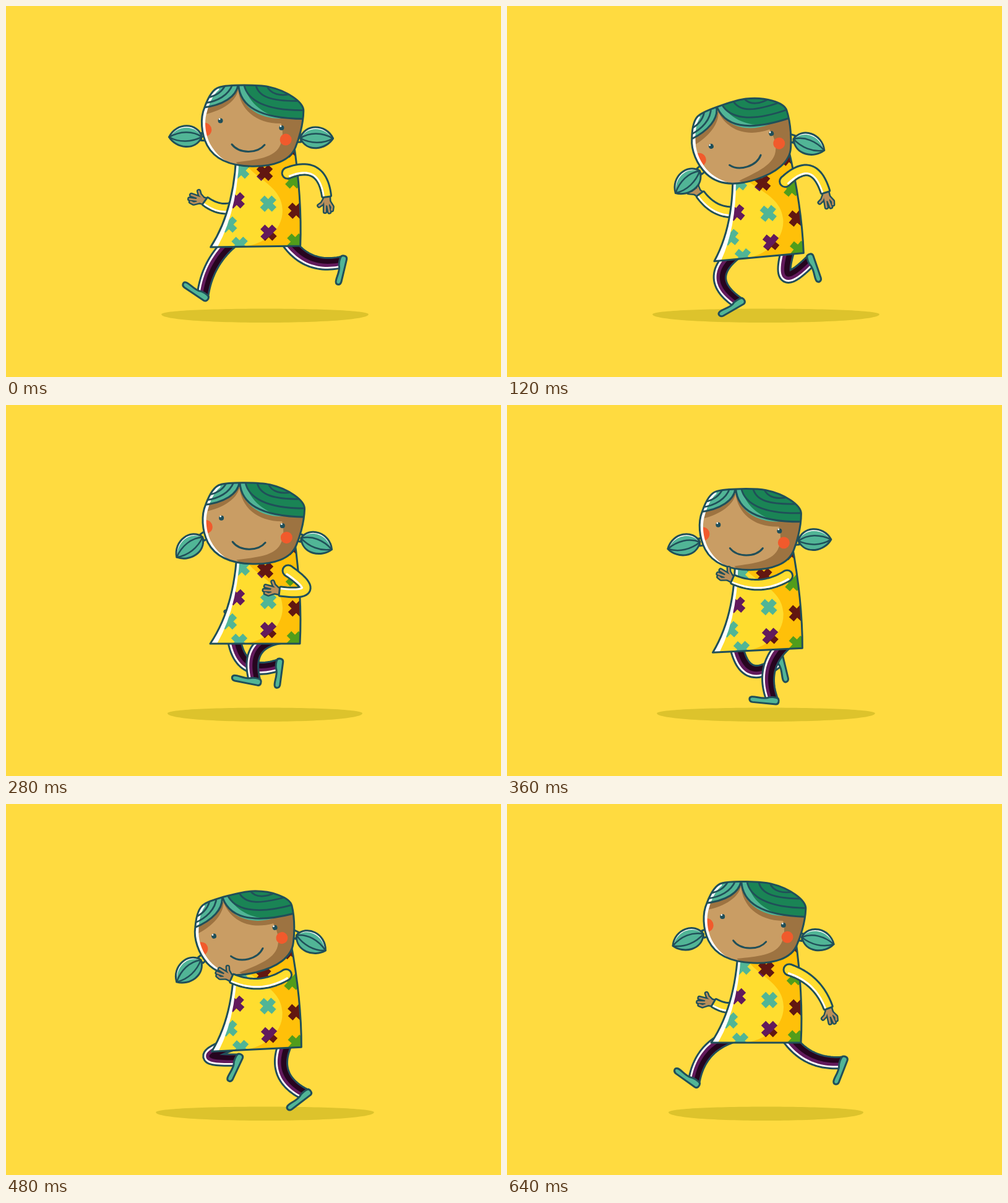
An HTML page with a canvas that plays this animation: 800x600 px, repeating every 680 ms.

```html
<!DOCTYPE html>
<html>
<head>
<meta charset="utf-8">
<style>
  html, body { margin: 0; width: 100%; height: 100%; overflow: hidden; background: #ffdb40; }
  canvas { display: block; }
</style>
</head>
<body>
<canvas id="stage" width="800" height="600"></canvas>
<script>
const ctx = document.getElementById('stage').getContext('2d');
const LOOP = 680, STEP = LOOP / 2, TICK = 40, FOOTFALL = 80;
const LEG_LENGTH = 107, ARM_LENGTH = 91;
const INK = '#204f59', TEAL = '#51b596', GREEN = '#1a8455', YELLOW = '#ffdd2f';
const PURPLE = '#621a5c', SKIN = '#c99d64', SKIN_SHADE = '#9d7341', BLUSH = '#f15a2c', HAND_SKIN = '#b98e5b';

// Key points of each limb's closed path: time, x, y. Wrists are relative to the shoulder.
const ANKLE = [
  [20, 329, 478], [80, 358, 494], [140, 384, 470], [210, 434, 432], [340, 444, 414],
  [420, 418, 408], [480, 375, 414], [550, 303, 439], [640, 302, 450]
];
const NEAR_WRIST = [[0, 63, 37], [80, 65, 1], [200, 63, 61], [360, -87, 6], [480, -87, 6], [560, -1, 81], [640, 63, 61]];
const FAR_WRIST = [[0, -67, 5], [80, -82, -41], [200, -43, 22], [360, 10, 22], [560, -11, 29], [640, -55, 14]];

// Position on a closed path, by monotone cubic interpolation.
function along(keys, time) {
  const n = keys.length, t = (time + LOOP) % LOOP;
  let i = n - 1;
  while (i >= 0 && keys[i][0] > t) i--;
  const row = j => keys[(j + n) % n];
  const at = j => row(j)[0] + Math.floor(j / n) * LOOP;
  const span = at(i + 1) - at(i), u = (t - at(i)) / span, v = 1 - u;
  return [1, 2].map(k => {
    const val = j => row(j)[k];
    const slope = j => (val(j + 1) - val(j)) / (at(j + 1) - at(j));
    const tangent = j => {
      const a = slope(j - 1), b = slope(j);
      return a * b > 0 ? 2 * a * b / (a + b) : 0;
    };
    return val(i) * v * v * (1 + 2 * u) + val(i + 1) * u * u * (3 - 2 * u)
      + span * u * v * (v * tangent(i) - u * tangent(i + 1));
  });
}

// Smooth bump from 0 to 1 and back, once per step.
function pulse(phase, centre, width) {
  const d = Math.abs(((phase - centre) % STEP + 1.5 * STEP) % STEP - STEP / 2);
  return d < width ? (1 + Math.cos(Math.PI * d / width)) / 2 : 0;
}

const P = d => new Path2D(d);
function fill(path, color) { ctx.fillStyle = color; ctx.fill(path); }
function stroke(path, width = 3, color = INK) {
  ctx.lineWidth = width;
  ctx.strokeStyle = color;
  ctx.stroke(path);
}
function dot(x, y, r, color) {
  const p = new Path2D();
  p.arc(x, y, r, 0, 7);
  fill(p, color);
}
function group(draw) { ctx.save(); draw(); ctx.restore(); }
function place(x, y, angle, draw) {
  group(() => { ctx.translate(x, y); ctx.rotate(angle); draw(); });
}
function rotate(x, y, angle) {
  const c = Math.cos(angle), s = Math.sin(angle);
  return [x * c - y * s, x * s + y * c];
}

// How far a limb of fixed length bulges when its ends come closer.
function bulge([ax, ay], [bx, by], length) {
  const chord = Math.hypot(bx - ax, by - ay);
  return Math.sqrt(Math.max(0, length * length - chord * chord) * 3 / 16);
}
// Curved limb: sampled points with unit normals, and the direction at its end.
function limb([ax, ay], [bx, by], sag) {
  const k = 2 * sag / Math.hypot(bx - ax, by - ay);
  const qx = (ax + bx) / 2 - (by - ay) * k, qy = (ay + by) / 2 + (bx - ax) * k;
  const points = Array.from({ length: 29 }, (_, i) => {
    const t = i / 28, s = 1 - t;
    const dx = s * (qx - ax) + t * (bx - qx), dy = s * (qy - ay) + t * (by - qy);
    const len = Math.hypot(dx, dy) || 1;
    return { t, x: s * s * ax + 2 * s * t * qx + t * t * bx, y: s * s * ay + 2 * s * t * qy + t * t * by,
      nx: -dy / len, ny: dx / len };
  });
  return { points, angle: Math.atan2(by - qy, bx - qx) };
}
// Band along a limb; from and to are fractions of its tapering half width.
function band(points, w0, w1, from = -1, to = 1) {
  const path = new Path2D();
  const add = (p, side) => {
    const w = (w0 + (w1 - w0) * p.t) * side;
    path.lineTo(p.x + p.nx * w, p.y + p.ny * w);
  };
  points.forEach(p => add(p, from));
  [...points].reverse().forEach(p => add(p, to));
  path.closePath();
  return path;
}

const FOOT = P('M-9 4C-5 6 4 6 9 3.5C18 1 28 5 34 3.5C39 2 38-4.5 32-5L-6-5.5C-11-5-11 1-9 4Z');
function leg(hip, ankle) {
  const { points, angle } = limb(hip, ankle, bulge(hip, ankle, LEG_LENGTH));
  const whole = band(points, 9, 7.5);
  stroke(whole, 6);
  fill(whole, PURPLE);
  fill(band(points, 9, 7.5, -1, 0), '#26051f');
  fill(band(points, 9, 7.5, .65, 1), '#fff');
  place(...ankle, angle + 2.02, () => { fill(FOOT, TEAL); stroke(FOOT); });
}

const FINGERS = P('M9-3L18-8L23-7M11-1L26-3M11 3L25 4M6 4L12 8L15 13');
const PALM = P('M1 0L11 0');
function hand() {
  stroke(PALM, 14);
  stroke(FINGERS, 7.5);
  stroke(PALM, 9, HAND_SKIN);
  stroke(FINGERS, 2.8, HAND_SKIN);
}
function arm(shoulder, wrist, sag, turn, lightSide) {
  const { points, angle } = limb(shoulder, wrist, sag);
  place(...wrist, angle + turn, hand);
  const sleeve = band(points, 7.5, 6), cap = new Path2D();
  cap.arc(...shoulder, 7.5, 0, 7);
  for (const part of [cap, sleeve]) stroke(part, 6);
  for (const part of [cap, sleeve]) fill(part, YELLOW);
  fill(band(points, 7.5, 6, lightSide * .55, lightSide), '#fff');
}

const DRESS = P('M374 215Q373 322 330 386L475 386Q479 310 466 215Z');
const DRESS_LIGHT = P('M374 215Q373 322 330 386L341 386Q378 322 379 215Z');
const DRESS_SHADE = P('M386 248C400 276 447 287 447 328C447 362 415 383 383 386L490 392L490 200L386 200Z');
const CROSS = P('M-9.5-9.5L9.5 9.5M9.5-9.5L-9.5 9.5');
const CROSSES = [
  [PURPLE, [419, 267], [373, 311], [469, 329], [424, 364], [465, 230]],
  [TEAL, [381, 263], [424, 317], [360, 350], [377, 383], [467, 379], [465, 280]]
];
function dress() {
  group(() => {
    ctx.clip(DRESS);
    fill(DRESS, YELLOW);
    ctx.lineCap = 'butt';
    for (const [color, ...spots] of CROSSES)
      for (const [x, y] of spots) place(x, y, 0, () => stroke(CROSS, 10.5, color));
    ctx.globalCompositeOperation = 'multiply';
    fill(DRESS_SHADE, 'rgb(255,222,45)');
    ctx.globalCompositeOperation = 'source-over';
    fill(DRESS_LIGHT, '#fff');
  });
  stroke(DRESS);
}

const LEAF = P('M0 0C7-23 42-23 53 2C41 20 10 24 0 0Z');
const VEINS = P('M0 0C16-10 36-8 53 2M0 0C16 9 36 11 53 2');
const TIE = P('M-9-6L1-6L1 6L-9 6Z');
function pigtail([x, y], angle, flip) {
  group(() => {
    ctx.translate(x, y);
    ctx.scale(flip, 1);
    ctx.rotate(angle);
    fill(TIE, YELLOW);
    stroke(TIE);
    group(() => {
      ctx.clip(LEAF);
      fill(LEAF, '#fff');
      ctx.translate(0, 3);
      fill(LEAF, TEAL);
    });
    stroke(VEINS, 2.5);
    stroke(LEAF);
  });
}

const HEAD = P('M345 130C360 125 410 125 425 128C455 134 482 152 482 166C482 190 474 215 470 225C462 247 435 257 400 257C363 257 339 246 327 224C317 205 315 180 322 163C328 145 335 133 345 130Z');
const HEAD_LIGHT = P('M375 257C358 254 338 246 327 224C317 205 315 180 322 163C328 145 335 133 345 130L345 134C335 142 329 158 326 170C321 186 324 207 332 222C341 238 355 250 375 257Z');
const FACE_SHADE = P('M376 134C380 165 405 188 446 187C449 195 450 210 446 220C438 244 405 246 374 251L400 275L500 262L500 130ZM376 134C372 155 345 170 318 175L310 150Z');
const FRINGE = P('M376 120C376 160 410 181 490 179L490 110Z');
const FRINGE_LIGHT = P('M376 120C376 160 410 181 448 179C420 174 389 155 385 120Z');
const LOCK = P('M376 120C377 145 350 160 315 164L310 115Z');
const STRANDS = P('M385 124C390 150 420 167 484 165M404 124C408 145 430 152 480 150M422 126C428 141 445 143 462 139M367 124C361 143 342 153 322 156M356 124C351 137 340 144 327 147');
const SMILE = P('M367 222C379 237 408 237 420 222');
function head() {
  group(() => {
    ctx.clip(HEAD);
    fill(HEAD, SKIN);
    fill(FACE_SHADE, SKIN_SHADE);
    dot(323, 199, 11, BLUSH);
    dot(454, 213, 9.5, BLUSH);
    fill(FRINGE, GREEN);
    fill(FRINGE_LIGHT, TEAL);
    fill(LOCK, TEAL);
    fill(HEAD_LIGHT, '#fff');
    stroke(STRANDS, 2.8);
    stroke(FRINGE);
    stroke(LOCK);
  });
  stroke(HEAD);
  for (const [x, y] of [[348, 184], [447, 194]]) {
    dot(x, y, 4, INK);
    dot(x - 1.5, y - 2.5, 1.4, '#fff');
  }
  stroke(SMILE);
}

function shadow(squash) {
  const half = 157.5 + 32 * Math.sqrt(squash), l = 418.5 - half, r = 418.5 + half;
  fill(P(`M${l} 498.5C${l} 486.5 ${r} 486.5 ${r} 498.5C${r} 516.5 ${l} 516.5 ${l} 498.5Z`), '#ddc32c');
}

function draw(time) {
  const phase = time - FOOTFALL;
  const squash = pulse(phase, 0, 100), lean = -.14 * squash, drop = 28 * squash;
  const onBody = (x, y) => {
    const [dx, dy] = rotate(x - 424, y - 336, lean);
    return [424 + dx, 336 + drop + dy];
  };
  // The head dips just after the body, nods later still and rises before the next footfall.
  const dip = pulse(phase, 8, 105);
  const hx = 397.5 - 24 * dip, hy = 189 + 35 * dip;
  const tilt = .04 * pulse(phase, 225, 60) - .32 * pulse(phase, 30, 90);
  const leftSwing = .7 - .74 * pulse(phase, 255, 70);
  const rightSwing = .28 + .37 * Math.cos(2 * Math.PI * (phase - 120) / STEP);
  const onHead = (x, swing) => {
    const [dx, dy] = rotate(x, 27, tilt);
    return [hx + dx, hy + dy - 8 * (.65 - swing)];
  };
  const shifted = ([x, y], [dx, dy]) => [x + dx, y + dy];

  ctx.lineJoin = ctx.lineCap = 'round';
  ctx.fillStyle = '#ffdb40';
  ctx.fillRect(0, 0, 800, 600);
  shadow(squash);

  const farShoulder = onBody(390, 308);
  arm(farShoulder, shifted(farShoulder, along(FAR_WRIST, time)), -14, -.35, -1);
  leg(onBody(368, 374), along(ANKLE, time));
  leg(onBody(452, 374), shifted(along(ANKLE, time - STEP), [100, 0]));
  place(424, 336 + drop, lean, () => { ctx.translate(-424, -336); dress(); });
  pigtail(onHead(-79, leftSwing), leftSwing, -1);
  pigtail(onHead(80, rightSwing), rightSwing, 1);
  place(hx, hy, tilt, () => { ctx.translate(-397.5, -189); head(); });

  const shoulder = onBody(456, 268), reach = along(NEAR_WRIST, time), wrist = shifted(shoulder, reach);
  arm(shoulder, wrist, -bulge(shoulder, wrist, ARM_LENGTH), .07, reach[0] > -20 ? 1 : -1);
}

function play() {
  draw(Math.floor(performance.now() % LOOP / TICK) * TICK);
  requestAnimationFrame(play);
}
play();
</script>
</body>
</html>
```
